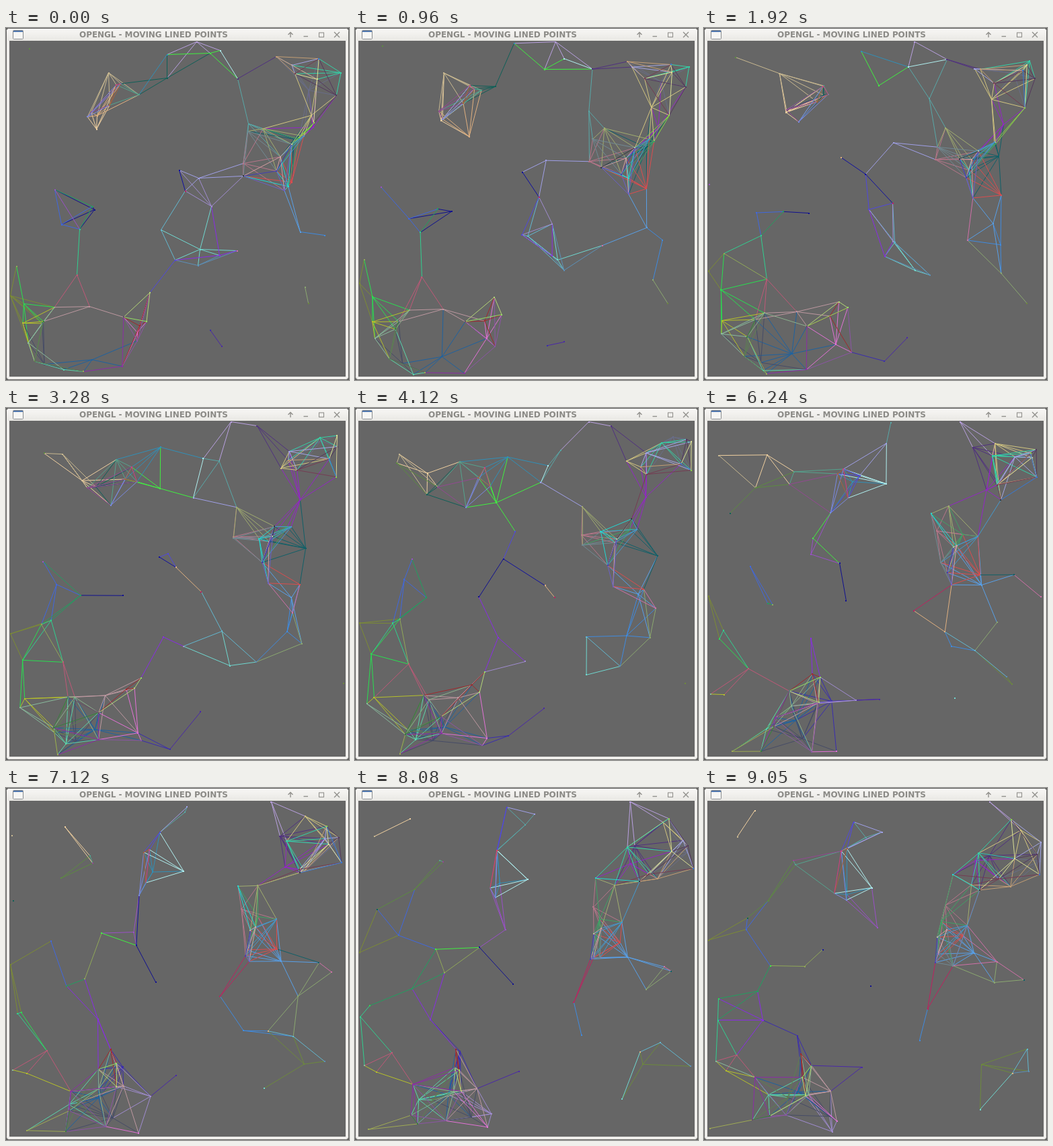
An HTML page with a canvas that plays this animation: 510x524 px, repeating every 9070 ms.

```html
<!DOCTYPE html>
<html lang="en">
<head>
<meta charset="utf-8">
<title>Moving lined points</title>
<style>
  html, body { margin: 0; width: 100%; height: 100%; overflow: hidden; background: #efeeeb; }
  svg, canvas { position: absolute; left: 0; top: 0; display: block; }
  canvas { left: 5px; top: 19px; }
  text { font: bold 12px "DejaVu Sans", sans-serif; letter-spacing: -.06px; fill: #8b8a86; }
</style>
</head>
<body>
<svg width="510" height="524" viewBox="0 0 510 524">
  <defs>
    <linearGradient id="bar" x2="0" y2="1">
      <stop offset="0" stop-color="#f8f7f5"/>
      <stop offset="1" stop-color="#e9e8e4"/>
    </linearGradient>
  </defs>
  <rect width="510" height="524" fill="#5c5c5a"/>
  <rect x=".5" y=".5" width="509" height="523" rx="4" fill="#efeeeb" stroke="#5c5c5a"/>
  <rect x="1" y="1" width="508" height="18" rx="4" fill="url(#bar)"/>
  <rect x="10.5" y="3.5" width="15" height="13" rx="1" fill="#f6f6f4" stroke="#888b8e"/>
  <rect x="11" y="4" width="14" height="2" fill="#5078b0"/>
  <text x="109" y="14">OPENGL - MOVING LINED POINTS</text>
  <g fill="none" stroke="#91908c" stroke-width="1.4">
    <path d="M423 14V7M419.5 10L423 6.500L426.500 10"/>
    <path d="M442.500 12.500H449"/>
    <rect x="465.500" y="7" width="7" height="6.500" stroke-width="1.100"/>
    <path d="M488 6L496 14M496 6L488 14"/>
  </g>
</svg>
<canvas id="view" width="500" height="500"></canvas>
<script>
const LOOP = 9070, STEP = 40, LAST = 9050, REACH = 75;
const ctx = document.getElementById('view').getContext('2d');

// start x, y and end x, y of straight paths; values past a wall are folded back
const paths = [
  ['#b9a0e0', 283, 20, 424, 20],
  ['#7c8c34', 6, 398, 6, 226],
  ['#3f8be0', 473, 308, 320, 375],
  ['#58a0e8', 437, 303, 401, 245],
  ['#8ba870', 444, 385, 431, 289],
  ['#6d8a3c', 449, 409, 594, 411],
  ['#4a28a8', 320, 473, 234, 415],
  ['#3a2cb0', 303, 449, 138, 668],
  ['#6fd8d0', 288, 329, 410, 478],
  ['#62b8d0', 230, 300, 480, 388],
  ['#5c90b8', 285, 353, 524, 421],
  ['#8a2be8', 317, 338, 87, 345],
  ['#a08cd0', 305, 265, 190, 511],
  ['#d070a8', 343, 331, 571, 258],
  ['#101090', 131, 270, 247, 294],
  ['#4068e0', 82, 292, 62, 210],
  ['#20a060', 128, 265, 79, 302],
  ['#9a50c8', -60, 240, 257, 207],
  ['#30d090', 109, 299, -8, 345],
  ['#28e050', 26, 410, 21, 313],
  ['#90a858', -3, 354, 149, 265],
  ['#c05878', 105, 367, 48, 397],
  ['#f0d0a0', 134, 150, 75, 33],
  ['#c8b890', 152, 66, -37, 72],
  ['#5c8c40', 34, 10, 95, 167],
  ['#0e6058', 239, 74, -52, 193],
  ['#40f040', 303, 37, 98, 264],
  ['#3090b8', 239, 1, 212, 158],
  ['#58a8a8', 360, 142, 240, -33],
  ['#b0f0f0', 318, 33, 249, 148],
  ['#a0a0e8', 286, 223, 264, -25],
  ['#5048e0', 251, 345, 222, -10],
  ['#1010a0', 257, 211, 176, 240],
  ['#503080', 344, -35, 424, 100],
  ['#106068', 428, 165, 475, 285],
  ['#e0b080', 135, 130, 458, 424],
  ['#c02060', 266, 242, 332, 328]
];

// busy areas filled with roaming points: left, top, right, bottom, count
const areas = [
  [8, 385, 220, 516, 18],
  [400, 40, 503, 150, 11],
  [335, 125, 445, 270, 12],
  [120, 75, 215, 195, 6]
];

let seed = 71;
function rand() {
  seed = (seed * 16807) % 2147483647;
  return seed / 2147483647;
}

function fold(v, lo, hi) {
  const span = hi - lo;
  const d = (((v - lo) % (2 * span)) + 2 * span) % (2 * span);
  return lo + (d > span ? 2 * span - d : d);
}

const walls = [6, 20, 503, 518];
const points = paths.map(([color, x, y, ex, ey]) =>
  ({ color, x, y, dx: ex - x, dy: ey - y, box: walls }));

for (const [l, t, r, b, count] of areas) {
  for (let i = 0; i < count; i++) {
    const tone = () => Math.round(30 + rand() * 200);
    points.push({
      color: `rgb(${tone()},${tone()},${tone()})`,
      x: l + rand() * (r - l), y: t + rand() * (b - t),
      dx: (rand() - 0.5) * 260, dy: (rand() - 0.5) * 260,
      box: [l, t, r, b]
    });
  }
}

function place(p, k) {
  const [l, t, r, b] = p.box;
  return {
    color: p.color,
    x: fold(p.x + p.dx * k, l, r) - 4.5,
    y: fold(p.y + p.dy * k, t, b) - 18.5
  };
}

function draw(time) {
  const k = time / LAST;
  const now = points.map(p => place(p, k));
  ctx.fillStyle = '#666';
  ctx.fillRect(0, 0, 500, 500);
  ctx.lineWidth = 1;
  now.forEach((a, i) => {
    ctx.strokeStyle = ctx.fillStyle = a.color;
    ctx.beginPath();
    for (const b of now.slice(i + 1)) {
      if (Math.hypot(a.x - b.x, a.y - b.y) < REACH) {
        ctx.moveTo(a.x, a.y);
        ctx.lineTo(b.x, b.y);
      }
    }
    ctx.stroke();
    ctx.fillRect(Math.round(a.x - 1), Math.round(a.y - 1), 2, 2);
  });
}

const begin = performance.now();
function tick() {
  const ms = (performance.now() - begin) % LOOP;
  draw(ms >= LAST ? LAST : Math.min(Math.floor(ms / STEP) * STEP, 9000));
  requestAnimationFrame(tick);
}
tick();
</script>
</body>
</html>
```
